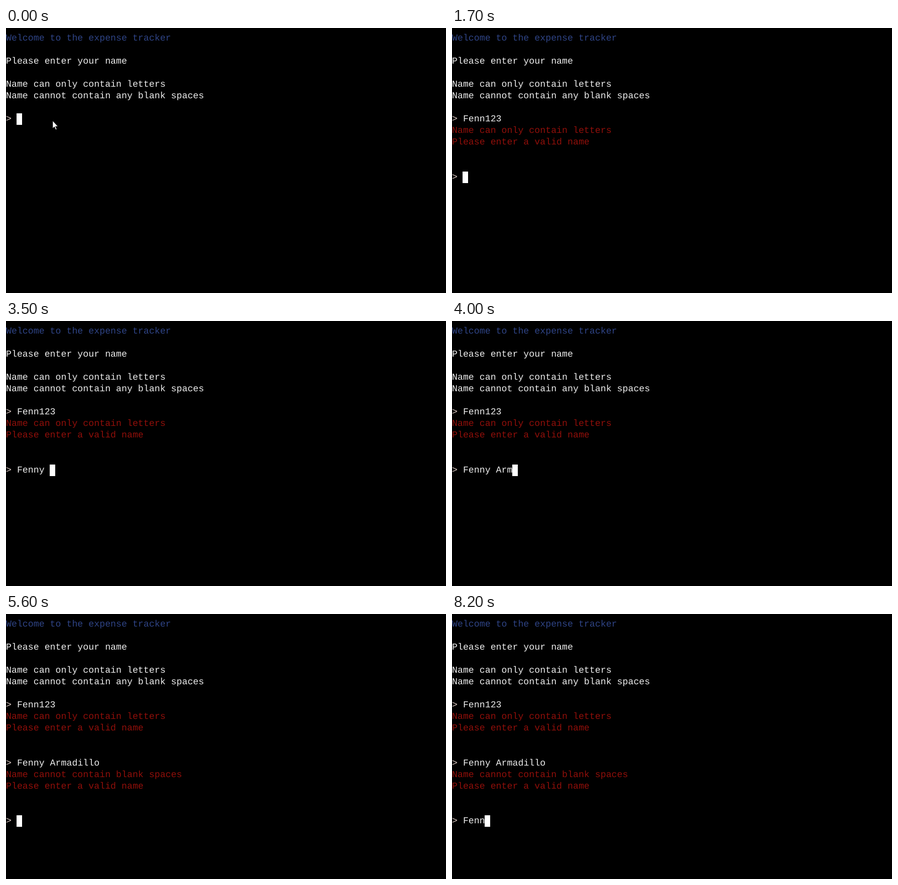
Recreate the animation shown at these times as an HTML page. Size 876 px wide and 528 px high, loop 8300 ms.

```html
<!DOCTYPE html>
<html lang="en">
<head>
<meta charset="utf-8">
<title>Expense tracker</title>
<style>
  html, body { margin: 0; width: 100%; height: 100%; overflow: hidden; background: #000; }
  #term {
    position: relative; width: 876px; height: 528px; overflow: hidden;
    font: 18.26px/23px "Liberation Mono", "Courier New", monospace;
    text-rendering: geometricPrecision; font-variant-ligatures: none;
    color: #ededed;
  }
  .line { position: absolute; left: 0; padding-top: 1px; white-space: pre; }
  .title { color: #2f4486; }
  .error { color: #900f0a; }
  .prompt b { font-weight: normal; color: #d8c6c0; }
  #cursor { position: absolute; width: 11px; height: 23px; background: #fff; }
  #mouse { position: absolute; left: 92px; top: 184px; }
</style>
</head>
<body>
<div id="term">
  <div id="cursor"></div>
  <svg id="mouse" width="14" height="21" viewBox="0 0 14 21">
    <path d="M1 1V16L4.4 12.8L7 18.6L9 17.7L6.5 12H11.2Z" fill="#fff" stroke="#000" stroke-width=".6"/>
  </svg>
</div>
<script>
const LOOP = 8300, CELL_W = 10.957, CELL_H = 23.06, TOP = 8.8;
const term = document.getElementById("term");
const cursor = document.getElementById("cursor");
const mouse = document.getElementById("mouse");

const rowTop = row => Math.round(TOP + row * CELL_H);

function addLine(row, text, kind = "") {
  const el = document.createElement("div");
  el.className = "line " + kind;
  el.style.top = rowTop(row) + "px";
  el.textContent = text;
  term.insertBefore(el, cursor);
  return el;
}

function addPrompt(row) {
  const el = addLine(row, "", "prompt");
  el.innerHTML = "<b>&gt;</b> <span></span>";
  return el;
}

addLine(0, "Welcome to the expense tracker", "title");
addLine(2, "Please enter your name");
addLine(4, "Name can only contain letters");
addLine(5, "Name cannot contain any blank spaces");

// Each entry: prompt row, start time, typed text, one key time per letter, reply
const entries = [
  { row: 7, start: 0, text: "Fenn123",
    keys: [100, 200, 200, 400, 800, 1000, 1200],
    error: "Name can only contain letters" },
  { row: 12, start: 1700, text: "Fenny Armadillo",
    keys: [2400, 2600, 2700, 2900, 3300, 3500, 3700, 3900, 4000,
           4300, 4400, 4600, 4700, 4900, 5100],
    error: "Name cannot contain blank spaces" },
  { row: 17, start: 5600, text: "Fenn", keys: [6000, 6200, 6400, 6600] }
];

for (const e of entries) {
  e.prompt = addPrompt(e.row);
  e.input = e.prompt.querySelector("span");
  e.reply = e.error ? [
    addLine(e.row + 1, e.error, "error"),
    addLine(e.row + 2, "Please enter a valid name", "error")
  ] : [];
}

const show = (el, on) => { el.style.visibility = on ? "visible" : "hidden"; };

function draw(t) {
  entries.forEach((e, i) => {
    const next = entries[i + 1];
    const started = t >= e.start;
    const done = next !== undefined && t >= next.start;
    const typed = e.keys.filter(k => t >= k).length;
    show(e.prompt, started);
    e.input.textContent = e.text.slice(0, typed);
    e.reply.forEach(el => show(el, done));
    if (started && !done) {
      cursor.style.left = Math.round((typed + 2) * CELL_W - 0.5) + "px";
      cursor.style.top = rowTop(e.row) + "px";
    }
  });
  show(mouse, t < 100);
}

const origin = performance.now();
function tick() {
  draw((performance.now() - origin) % LOOP);
  requestAnimationFrame(tick);
}
draw(0);
requestAnimationFrame(tick);
</script>
</body>
</html>
```
